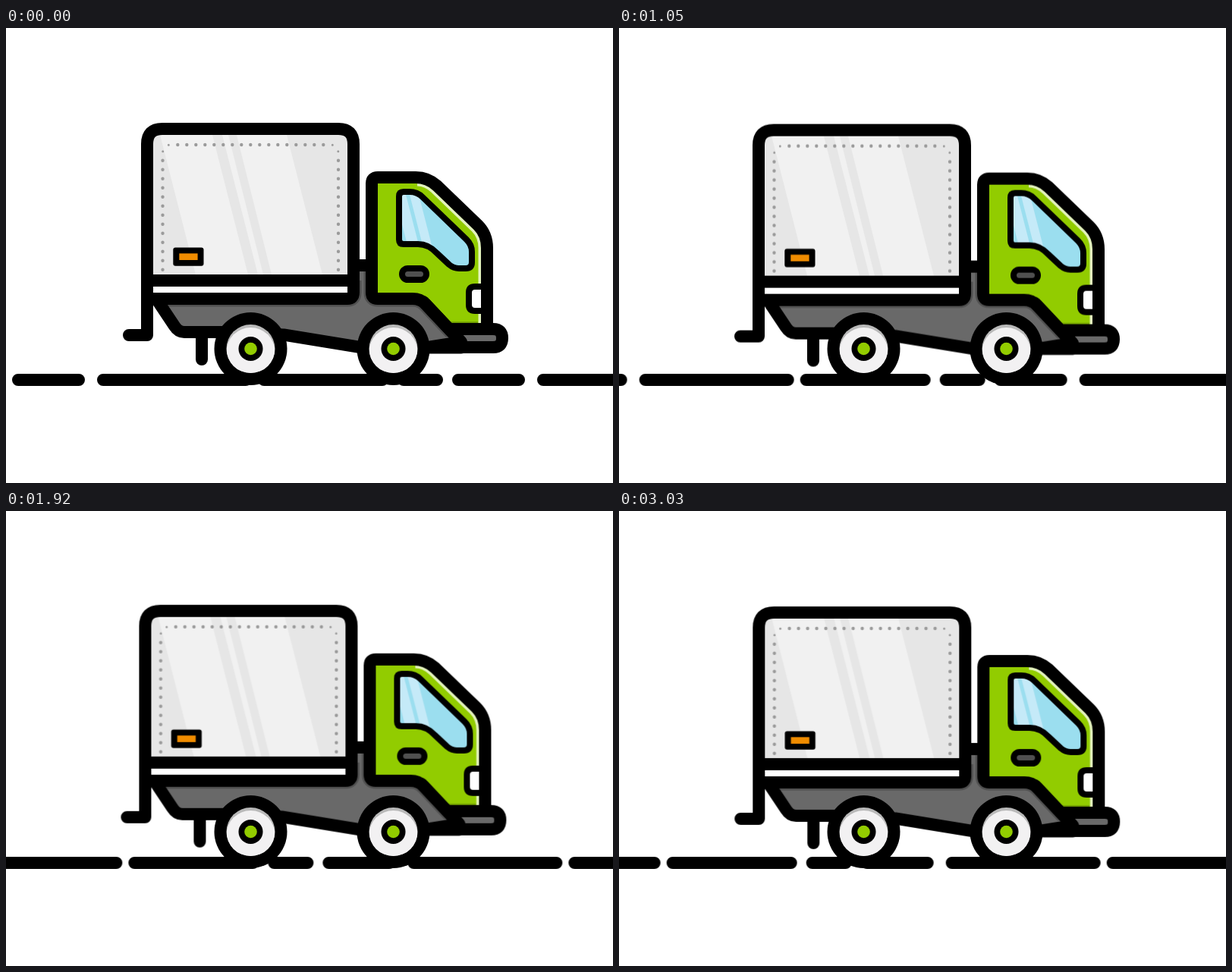
Write an HTML page that moves like this. It is 800 by 600 pixels and loops after 3.06 s.

```html
<!DOCTYPE html>
<html lang="en">
<head>
<meta charset="utf-8">
<title>Delivery truck</title>
<style>
  html, body { margin: 0; width: 100%; height: 100%; overflow: hidden; background: #fff; }
  svg { display: block; width: 800px; height: 600px; }

  .line { fill: none; stroke: #000; stroke-width: 16; stroke-linecap: round; stroke-linejoin: round; }
  .thin { stroke: #000; stroke-width: 8; stroke-linejoin: round; }
  .shade { fill: none; stroke: #505050; stroke-width: 21; }
  .dots { fill: none; stroke: #9b9b9b; stroke-width: 4.4; stroke-linecap: round; stroke-dasharray: 0 12; }

  .road { stroke-dasharray: 188 24 156 28 44 28 80 32; animation: drive 3060ms steps(102) infinite; }
  .sway { animation: sway 3060ms ease-in-out infinite; }
  .bob { animation: bob 3060ms ease-in-out infinite; }

  @keyframes drive { to { transform: translateX(-272px); } }

  @keyframes sway {
    0% { transform: translateX(0); }
    22.55% { transform: translateX(-2.2px); }
    34.31% { transform: translateX(-2px); }
    52.94% { transform: translateX(-2.8px); animation-timing-function: ease-in; }
    73.53% { transform: translateX(-2.1px); animation-timing-function: ease-out; }
    86.27% { transform: translateX(-1px); }
    100% { transform: translateX(-1.7px); }
  }

  @keyframes bob {
    0% { transform: translateY(0); }
    22.55% { transform: translateY(2.5px); animation-timing-function: ease-in; }
    34.31% { transform: translateY(1.6px); animation-timing-function: linear; }
    52.94% { transform: translateY(.2px); animation-timing-function: ease-out; }
    62.09% { transform: translateY(-1.3px); animation-timing-function: ease-in; }
    73.53% { transform: translateY(1.7px); animation-timing-function: ease-out; }
    86.27% { transform: translateY(3.7px); animation-timing-function: ease-in; }
    100% { transform: translateY(.5px); }
  }
</style>
</head>
<body>
<svg viewBox="0 0 800 600">
  <defs>
    <path id="chassis" d="M198 357L222 393Q227 401 235 401H290L366 404.5L470 421.5H600L550 357H482V313H458V357Z"/>
    <path id="cab" d="M482 205Q482 197 490 197H540Q556 197 568 208L622 260Q634 272 634 290V397H584L553 364Q546 357 536 357H490Q482 357 482 349Z"/>
    <path id="tray" d="M186 357H450Q458 357 458 349V333"/>
    <path id="glass" d="M518 222Q518 216 524 216H532Q542 216 549 223L607 279Q614 286 614 295V309Q614 317 606 317H597Q590 317 584 312L568 297Q557 285 543 285H524Q518 285 518 279Z"/>
    <clipPath id="inChassis"><use href="#chassis"/></clipPath>
    <clipPath id="inCab"><use href="#cab"/></clipPath>
    <clipPath id="inGlass"><use href="#glass"/></clipPath>
    <clipPath id="inRim"><circle r="32"/></clipPath>
    <g id="wheel">
      <circle r="48"/>
      <circle r="32" fill="#b9b9b9"/>
      <circle r="32" cy="4" fill="#f2f1f2" clip-path="url(#inRim)"/>
      <circle r="16"/>
      <circle r="8.3" fill="#92cc00"/>
    </g>
  </defs>

  <path class="line road" d="M-452 464H1500"/>

  <g class="sway"><g class="bob">
    <!-- chassis -->
    <path class="line" d="M258 401V437"/>
    <use href="#chassis" fill="#696969"/>
    <g clip-path="url(#inChassis)">
      <use href="#tray" class="shade"/>
      <use href="#cab" class="shade"/>
    </g>
    <path class="line" d="M198 357L222 393Q227 401 235 401H290L366 404.5L470 421.5H600M458 313H482"/>

    <!-- cargo box -->
    <path fill="#e6e6e6" d="M186 153Q186 133 206 133H438Q458 133 458 153V333H186Z"/>
    <path fill="#f1f1f1" d="M202 137H271L321 333H252ZM284 137H292L341 333H334ZM303 137H369L419 333H352Z"/>
    <path class="dots" d="M226.3 154H419M206.5 174.7V319M438 174.7V319"/>
    <path class="dots" stroke-width="3" style="stroke-width:3" d="M214.3 154.3h.1M430.3 154.3h.1M206.7 162.8h.1M437.8 162.8h.1"/>
    <path fill="#fff" d="M186 333H458V357H186Z"/>
    <path class="line" d="M162 405H186V153Q186 133 206 133H438Q458 133 458 153V333H186"/>
    <use href="#tray" class="line"/>
    <rect x="220.3" y="289.5" width="40.2" height="24.3" rx="3"/>
    <rect x="228.3" y="297.3" width="24.3" height="8.7" fill="#f08c00"/>

    <!-- bumper -->
    <path class="line" style="fill:#696969" d="M584 397H642Q654 397 654 409T642 421H556L600 414Z"/>

    <!-- cab -->
    <use href="#cab" fill="#92cc00"/>
    <g clip-path="url(#inCab)" fill="none">
      <path stroke="#e3f2bd" stroke-width="23" d="M542 197Q556 197 568 208L622 260Q634 272 634 290V389"/>
      <path stroke="#6f9b00" stroke-width="2" d="M576 388.3H622"/>
    </g>
    <path class="thin" fill="#fff" d="M632 341H618Q610 341 610 349V365Q610 373 618 373H632"/>
    <use href="#cab" class="line"/>
    <path class="line" d="M550 361L598 412"/>

    <use href="#glass" fill="#9bdeef"/>
    <path fill="#c5eaf8" clip-path="url(#inGlass)" d="M510 212H525L545 290H530ZM530 212H542L562 290H550Z"/>
    <use href="#glass" class="thin" fill="none"/>
    <rect class="thin" x="522" y="317" width="32" height="15" rx="7.5" fill="#505050"/>
  </g></g>

  <use href="#wheel" x="322.5" y="423"/>
  <use href="#wheel" x="510.5" y="423"/>
</svg>
</body>
</html>
```
